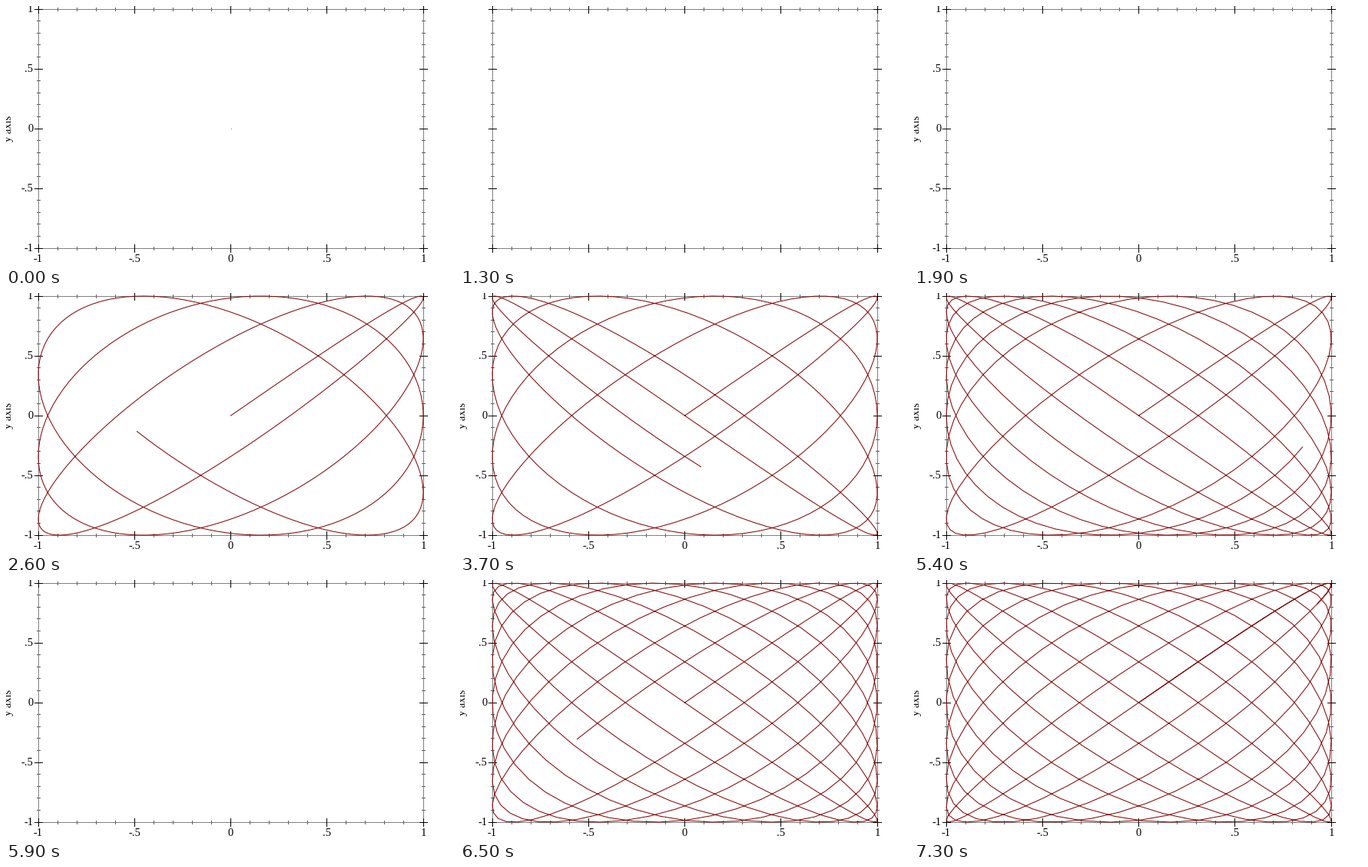
Write a matplotlib script that moves like this. It is 583x338 px and loops after 8 s.

```python
import matplotlib.pyplot as plt
import numpy as np
from matplotlib.animation import FuncAnimation

WIDTH, HEIGHT, DPI = 583, 338, 64
PX = 72 / DPI  # one pixel in points
STEP_MS, LOOP_MS = 100, 8000

LEFT, RIGHT, TOP, BOTTOM = 42, 543, 4, 316
MID_X, MID_Y = (LEFT + RIGHT) / 2, (TOP + BOTTOM) / 2
HALF_W, HALF_H = (RIGHT - LEFT) / 2, (BOTTOM - TOP) / 2

SAMPLES = 400
T_STEP = 0.5

# Time at which each longer curve is fully drawn
DRAWN_AT = [0, 200, 800, 1400, 2000, 2600, 3100, 3700,
            4300, 4800, 5400, 6000, 6500, 7300]
# Short redraws: time -> number of layers shown (frame, title, labels, curve)
REDRAWS = {1300: 1, 1900: 3, 4200: 1, 5300: 0, 5900: 3, 7200: 2}

plt.rcParams["font.family"] = "Liberation Serif"
fig = plt.figure(figsize=(WIDTH / DPI, HEIGHT / DPI), dpi=DPI, facecolor="white")
ax = fig.add_axes([0, 0, 1, 1])
ax.set_xlim(0, WIDTH)
ax.set_ylim(HEIGHT, 0)
ax.axis("off")


def to_px(x, y):
    return MID_X + HALF_W * x, MID_Y - HALF_H * y


def segment(x, y, color):
    line, = ax.plot(x, y, color=color, lw=PX, snap=False,
                    solid_capstyle="butt", zorder=1)
    return line


def label(x, y, text, **style):
    return ax.text(x, y, text, fontsize=14.5 * PX, color="black",
                   va="baseline", **style)


def build_frame():
    parts = []
    for x in (LEFT, RIGHT):
        parts.append(segment([x + .5] * 2, [TOP, BOTTOM + 1], "#808080"))
    for y in (TOP, BOTTOM):
        parts.append(segment([LEFT, RIGHT + 1], [y + .5] * 2, "#808080"))
    for k in range(-10, 11):
        major = k % 5 == 0
        reach, color = (5, "black") if major else (2, "#606060")
        px, py = (int(v) + .5 for v in to_px(k / 10, k / 10))
        for y in (TOP, BOTTOM):
            parts.append(segment([px] * 2, [y - reach, y + reach + 1], color))
        for x in (LEFT, RIGHT):
            parts.append(segment([x - reach, x + reach + 1], [py] * 2, color))
    return parts


def build_labels():
    parts = []
    for value, text in zip((-1, -.5, 0, .5, 1), ("-1", "-.5", "0", ".5", "1")):
        px, py = to_px(value, value)
        parts.append(label(px, 334, text, ha="center"))
        parts.append(label(35.5, py + 4, text, ha="right"))
    return parts


title = label(7, MID_Y, "y axis", ha="center", rotation=90,
              rotation_mode="anchor")
curve, = ax.plot([], [], color="#800000", lw=PX, snap=False,
                 solid_joinstyle="round", zorder=3)
start_dot, = ax.plot([MID_X], [MID_Y], "s", color="#808080", ms=PX,
                     mew=0, zorder=3)
layers = [build_frame(), [title], build_labels(), [curve, start_dot]]
artists = [part for layer in layers for part in layer]


def update(frame):
    now = frame * STEP_MS
    shown = REDRAWS.get(now, len(layers))
    for depth, layer in enumerate(layers):
        for part in layer:
            part.set_visible(depth < shown)

    end = T_STEP * (sum(start <= now for start in DRAWN_AT) - 1)
    t = np.linspace(0, end, SAMPLES)
    curve.set_data(*to_px(np.sin(9 * t), np.sin(10 * t)))
    if end == 0:
        curve.set_visible(False)
    else:
        start_dot.set_visible(False)
    return artists


anim = FuncAnimation(fig, update, frames=LOOP_MS // STEP_MS,
                     interval=STEP_MS, repeat=True, repeat_delay=0)
plt.show()
```
